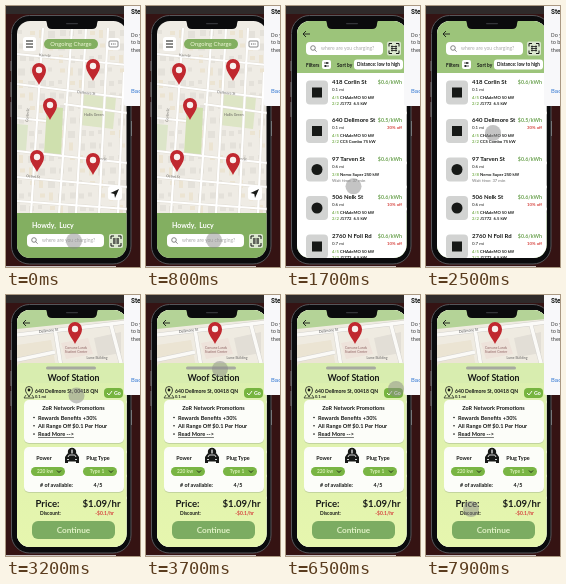
An HTML page for the animation above (8000 ms loop, 134x261 px).

```html
<!DOCTYPE html>
<html lang="en">
<head>
<meta charset="utf-8">
<title>Charging station app</title>
<style>
html, body { margin: 0; width: 100%; height: 100%; overflow: hidden; background: #351313; }
svg { display: block; width: 134px; height: 261px; }
text { font-family: Lato, "Open Sans", sans-serif; white-space: pre; }
.ui { font-family: Roboto, Inter, sans-serif; }
</style>
</head>
<body>
<svg id="stage" viewBox="0 0 134 261" xmlns="http://www.w3.org/2000/svg"></svg>
<script>
const GREEN = '#83af61', INK = '#171917', RED = '#d5423d';

const rect = (x, y, w, h, fill, r = 0, extra = '') =>
  `<rect x="${x}" y="${y}" width="${w}" height="${h}" rx="${r}" fill="${fill}" ${extra}/>`;
const circle = (x, y, r, fill, extra = '') =>
  `<circle cx="${x}" cy="${y}" r="${r}" fill="${fill}" ${extra}/>`;
const line = (d, color, width, extra = '') =>
  `<path d="${d}" fill="none" stroke="${color}" stroke-width="${width}" ${extra}/>`;
const shape = (d, fill) => `<path d="${d}" fill="${fill}"/>`;
const text = (x, y, s, size, fill = INK, weight = 400, anchor = 'start', extra = '') =>
  `<text x="${x}" y="${y}" font-size="${size}" fill="${fill}" font-weight="${weight}" text-anchor="${anchor}" ${extra}>${s}</text>`;
const group = (x, y, body, scale = 1) => `<g transform="translate(${x} ${y}) scale(${scale})">${body}</g>`;

const pin = (x, y) => group(x, y,
  shape('M0 13C-2 8-7 4-7-2A7 7 0 0 1 7-2C7 4 2 8 0 13Z', '#c0282f') + circle(0, -2, 3.2, '#f8f0ed'));

const backArrow = line('M24 28H17M20 25L17 28L20 31', INK, 0.9);

const scanIcon = (x, y) => group(x, y,
  line('M-5-2V-5H-2M2-5H5V-2M5 2V5H2M-2 5H-5V2', INK, 1) +
  line('M-3-2H3M-3 0H3M-3 2H3M-2-3V3M2-3V3', INK, 0.8));

const searchBar = (x, y, w) =>
  rect(x, y, w, 13, '#fff', 4) +
  circle(x + 7, y + 6, 2.3, 'none', 'stroke="#555" stroke-width=".7"') +
  line(`M${x + 8.6} ${y + 7.7}l2 2`, '#555', 0.7) +
  text(x + 15, y + 8.4, 'where are you charging?', 5, '#aaa');

function mapScreen() {
  let s = rect(11, 15, 110, 237, '#efece5');
  // Building footprints laid out along the blocks
  for (let row = 0; row < 15; row++) {
    for (let col = 0; col < 11; col++) {
      const k = (row * 7 + col * 5) % 6;
      s += rect(12 + col * 10 + k % 3, 24 + row * 12.5 + k % 2, 4 + k % 4, 4 + k % 5, k > 3 ? '#ece4d2' : '#e4e1da');
    }
  }
  s += shape('M41 100L57 102L55 151L38 148Z', '#cfe0ae') + shape('M76 88L110 92L107 123L74 119Z', '#dde5c5') +
    shape('M11 118L22 119L20 145H11Z', '#dce5c9');
  const roads = 'M11 48L121 59M11 78L121 92M11 112L40 115M58 98L121 107M11 145L121 157M11 171L121 181' +
    'M37 22L25 207M66 22L53 207M80 22L70 207M102 22L93 207M118 66L112 207M11 195L121 203';
  s += line(roads, '#e0dcd3', 3) + line(roads, '#fff', 2.2);
  const label = (x, y, name, angle = 6) =>
    text(x, y, name, 3.6, '#65635e', 400, 'start', `transform="rotate(${angle} ${x} ${y})"`);
  s += label(33, 50, 'Karn St') + label(71, 87, 'Dellmore St') + label(20, 171, 'Ostrel St') +
    label(86, 153, 'Tarven St') + label(78, 110, 'Hollis Green', 0) + label(22, 116, 'Corlin St', -84);
  for (const [x, y] of [[33, 66], [87, 62], [44, 101], [31, 153], [87, 156]]) s += pin(x, y);

  s += rect(17, 31, 13, 14, '#fff', 2.5) + line('M20 35H27M20 38H27M20 41H27', INK, 1.1);
  s += rect(38, 33, 54, 10, GREEN, 5) + text(65, 40, 'Ongoing Charge', 5.8, '#f0f8d8', 400, 'middle');
  s += rect(101, 32, 13, 12, '#fff', 2.5) +
    rect(103, 35, 9, 6, 'none', 1, 'stroke="#555" stroke-width=".7"') +
    line('M105 38H110', '#555', 1, 'stroke-dasharray="1 .8"');
  s += rect(102, 180, 14, 14, '#fff', 3) + shape('M113 183L109 192L108.3 188L104.5 187Z', INK);
  s += rect(11, 207, 110, 45, GREEN) + text(26, 221.5, 'Howdy,  Lucy', 7, '#fff', 700);
  return s + searchBar(21, 228, 77) + rect(103, 228, 14, 14, '#dbe7cf', 2) + scanIcon(110, 235);
}

function listScreen() {
  let s = rect(11, 15, 110, 237, '#fff') + rect(11, 15, 110, 52, '#9cc47a') + backArrow;
  s += searchBar(20, 36, 77) + rect(101, 35.5, 14, 14, '#dbe7cf', 2) + scanIcon(108, 42.5);
  s += text(20, 61, 'Filters', 4.8, INK, 700) + rect(36, 54, 9, 9, '#fff', 2) +
    line('M38 57H43M38 60H43', INK, 0.7) + circle(41, 57, 0.9, INK) + circle(39.5, 60, 0.9, INK);
  s += text(51, 61, 'Sort by', 4.8, INK, 700) + rect(68, 53.5, 49, 10, '#fff', 3) +
    text(92.5, 60.3, 'Distance: low to high', 4.6, INK, 700, 'middle');

  const rows = [
    ['418 Corlin St', '0.1 mi', '$0.6/kWh', '', 'square'],
    ['640 Dellmore St', '0.1 mi', '$0.5/kWh', '30% off', 'square'],
    ['97 Tarven St', '0.6 mi', '$0.6/kWh', '', 'circle'],
    ['506 Nelk St', '0.6 mi', '$0.6/kWh', '10% off', 'circle'],
    ['2760 N Foll Rd', '0.7 mi', '$0.6/kWh', '10% off', 'square']
  ];
  const plugs = [['4/5', 'CHAdeMO 50 kW'], ['2/2', 'J1772  6.5 kW']];
  const plugsAt = {
    1: [['4/5', 'CHAdeMO 50 kW'], ['2/2', 'CCS Combo 75 kW']],
    2: [['3/8', 'Nervo Super 250 kW'], ['', 'Wait time: 37 min']]
  };
  rows.forEach(([name, distance, price, offer, logo], i) => {
    const y = 77.5 + i * 38.5;
    s += rect(20, y - 3, 22, 24, '#d2d3d2', 4) +
      (logo === 'square' ? rect(26, y + 4, 10, 10, INK) : circle(31, y + 9, 5.5, INK));
    s += text(46, y, name, 6, INK, 700) + text(46, y + 7, distance, 4.4);
    s += text(116, y, price, 5.3, '#6da352', 700, 'end') + text(116, y + 7, offer, 4.3, RED, 700, 'end');
    (plugsAt[i] || plugs).forEach(([free, plug], j) => {
      s += text(46, y + 15 + j * 6, free, 4.2, '#76ae4c', 700) +
        text(free ? 54 : 46, y + 15 + j * 6, plug, 4.2, free ? INK : '#929292', 700);
    });
  });
  return s;
}

function stationScreen() {
  let s = rect(11, 15, 110, 237, 'url(#page)') + rect(11, 15, 110, 57, '#efebe1');
  s += shape('M11 15H121V24L60 29L11 34Z', '#b4d397') + shape('M11 50L45 45L50 72H11Z', '#ebe4d3') +
    shape('M55 48L82 43L87 59L60 64Z', '#eee2da') + shape('M88 43L115 37V58L92 62Z', '#e2ded6');
  const roads = 'M11 40L121 27M49 34L55 72M105 30L116 72M11 65L49 57';
  s += line(roads, '#d3d1cd', 4.5) + line(roads, '#fbfaf7', 3.5);
  s += text(33, 38, 'Dellmore St', 3.8, '#555', 400, 'start', 'transform="rotate(-7 33 38)"');
  s += pin(69, 36) + text(70, 54, 'Corvane Lands', 3.4, '#8f6463', 400, 'middle') +
    text(70, 58, 'Student Center', 3.4, '#8f6463', 400, 'middle') +
    text(91, 64, 'Lume Building', 3.4, '#666', 400, 'middle') + backArrow;
  s += rect(11, 68, 110, 20, '#d8edaf', 5) + rect(40, 71.5, 50, 3, '#a6a9a0', 1.5);
  s += text(67.5, 85.5, 'Woof Station', 8.8, INK, 700, 'middle');
  s += group(23, 97, line('M0 5C-1 2-3.5 1-3.5-2A3.5 3.5 0 0 1 3.5-2C3.5 1 1 2 0 5Z', INK, 0.8) +
    circle(0, -2, 1.4, INK) + line('M-3 3L-5 6H5L3 3', INK, 0.7));
  s += text(29, 98, '640 Dellmore St, 00418 QN', 5.1, INK, 700) + text(29, 103, '0.1 mi', 4, INK, 700);
  s += rect(98, 93, 19, 10, '#76b43f', 4) + line('M101 98L103 100L106 96', '#fff', 0.9) +
    text(108, 100, 'Go', 5.3, '#fff', 700);

  const card = (y, h) => rect(18, y + 1, 100, h, '#a9bc90', 5, 'opacity=".55"') + rect(18, y, 100, h, '#fcfdf9', 5);
  s += card(105, 43) + text(67.5, 114.5, 'ZoR Network Promotions', 5.5, INK, 700, 'middle');
  ['Rewards Benefits +30%', 'All Range Off $0.1 Per Hour', 'Read More --&gt;'].forEach((item, i) => {
    const y = 124.5 + i * 8.3;
    s += circle(28, y - 2, 0.8, INK) +
      text(32, y, item, 5.6, INK, 700, 'start', i === 2 ? 'text-decoration="underline"' : '');
  });
  s += card(152, 45) + text(38, 164.5, 'Power', 5.4, INK, 700, 'middle') +
    text(92, 164.5, 'Plug Type', 5.4, INK, 700, 'middle');
  s += circle(66, 157, 4.2, INK) + line('M66 154.5V159', '#fff', 1.2) +
    shape('M59 162L61.5 158.5H70.5L73 162V168H70V166.5H62V168H59Z', INK) +
    line('M62 162L63.2 160H68.8L70 162M61 164.5H63M69 164.5H71', '#fff', 0.8);
  for (const [x, label] of [[25, '220 kw'], [77, 'Type 1']]) {
    s += rect(x, 172, 34, 9, '#79b544', 4.5) + text(x + 14, 178.4, label, 4.9, '#d9efb8', 700, 'middle') +
      line(`M${x + 26} 175.5l2 2l2-2`, INK, 0.9);
  }
  s += text(34, 192, '# of available:', 5.4, INK, 700) + text(92, 192, '4/5', 5.4, INK, 700, 'middle');
  s += text(29.5, 212, 'Price:', 9.6, INK, 700) + text(114.5, 212, '$1.09/hr', 9.6, INK, 700, 'end');
  s += text(34, 219.5, 'Discount:', 4.9, INK, 700) + text(108, 219.5, '-$0.1/hr', 5, RED, 700, 'end');
  return s + rect(26, 226, 83, 18, '#7cac62', 6) + text(67.5, 238.2, 'Continue', 8.2, '#dff0c4', 700, 'middle');
}

const dialog = rect(118, -5, 24, 105, '#f8f8fa', 2) +
  [['Ste', 8, 6.4, INK, 700], ['Do you', 30.5, 5.6, '#444'], ['to begin', 38, 5.6, '#444'],
   ['them', 45.5, 5.6, '#444'], ['Back', 87, 6.2, '#397bd3']]
    .map(([s, y, size, fill, weight]) => text(125, y, s, size, fill, weight, 'start', 'class="ui"')).join('');

const stage = document.getElementById('stage');
stage.innerHTML = `
<defs>
  <clipPath id="screen"><rect x="11" y="15" width="109.5" height="237" rx="13"/></clipPath>
  <linearGradient id="page" x2="0" y2="1"><stop stop-color="#d8edaf"/><stop offset="1" stop-color="#e6f6ae"/></linearGradient>
</defs>
${rect(0, 0, 134, 261, '#351313')}
${rect(0, 0, 118, 8, '#2f2a2a')}
${rect(0, 260, 110, 1, '#c9c4c4')}
${rect(5.5, 9.5, 119.5, 248.5, '#0b0b0d', 18, 'stroke="#55565a" stroke-width="1"')}
${line('M5 55V65M5 76V91M5 96V111M125.5 115V130', '#77787b', 1)}
<g clip-path="url(#screen)">
  <g>${mapScreen()}</g>
  <g id="list">${listScreen()}</g>
  <g id="station">${stationScreen()}</g>
</g>
${shape('M39 14H93Q91 15 91 18Q91 23 86 23H46Q41 23 41 18Q41 15 39 14Z', '#0b0b0d')}
${rect(60, 17, 12, 1.2, '#34353a', 0.6)}
${dialog}
${circle(0, 0, 8, '#8a8a8a', 'id="cursor" opacity=".5"')}`;

const list = document.getElementById('list');
const station = document.getElementById('station');
const cursor = document.getElementById('cursor');

// Time, x and y of each cursor stop
const stops = [[0, 68, 235], [1200, 68, 234], [2200, 67, 127], [2800, 67, 127], [3600, 74, 74],
  [4200, 74, 74], [5000, 97, 98], [5300, 97, 98], [6300, 110, 94], [6800, 110, 94], [7800, 45, 214], [8000, 45, 214]];

const clamp = v => Math.max(0, Math.min(1, v));
const ease = v => v * v * (3 - 2 * v);
const fade = (t, start, length) => clamp((t - start) / length);

function draw(now) {
  const t = now % 8000;
  list.setAttribute('opacity', fade(t, 950, 420));
  station.setAttribute('opacity', fade(t, 2750, 400));
  const i = stops.findIndex(stop => stop[0] > t);
  const [t0, x0, y0] = stops[i - 1], [t1, x1, y1] = stops[i];
  const k = ease((t - t0) / (t1 - t0));
  cursor.setAttribute('transform', `translate(${x0 + (x1 - x0) * k} ${y0 + (y1 - y0) * k})`);
}

const start = performance.now();
function tick() {
  draw(performance.now() - start);
  requestAnimationFrame(tick);
}
tick();
</script>
</body>
</html>
```
